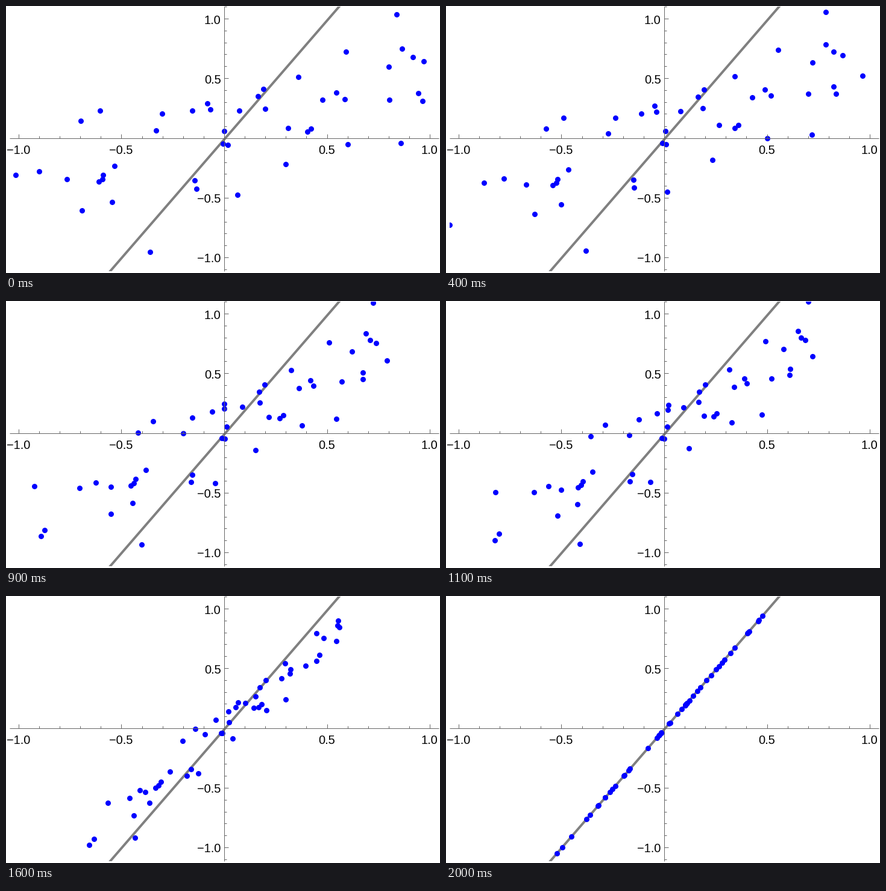
Write a matplotlib script that moves like this. It is 720x444 px and loops after 2100 ms.

```python
import numpy as np
import matplotlib.pyplot as plt
from matplotlib.animation import FuncAnimation
from matplotlib.patches import Rectangle

W, H, DPI = 720, 444, 100
PX = 72 / DPI                      # points per pixel
FRAMES, INTERVAL = 21, 100
ORIGIN = np.array([361, 219])      # axes crossing, in pixels
UNIT = np.array([341, -198])       # pixels per data unit
SLOPE, INTERCEPT = 1.995, -0.015
LEFT, RIGHT, TOP, BOTTOM = 5, 717, 0.5, 440

plt.rcParams["font.family"] = "Liberation Sans"

# Starting positions in pixels; some lie outside the plot range.
START = np.array([
    (-111, 262), (-46, 360.3), (-41, 349.6), (15, 280), (54, 274),
    (100, 287), (125, 339), (175, 325), (153, 291), (159, 287),
    (160, 280), (179, 265), (123, 191), (155, 174), (248, 206),
    (258, 179), (308, 174), (333, 162), (338, 172), (361, 207),
    (359, 228), (367, 230), (386, 174), (312, 289), (315, 303),
    (238, 408), (383, 313), (463, 262), (417, 150), (426, 138),
    (429, 171), (467, 202), (499, 208), (505, 203), (484, 118),
    (524, 156), (547, 144), (561, 155), (563, 76), (566, 229),
    (654, 227), (634, 101), (635, 156), (647, 14), (656, 71),
    (674, 85), (692, 92), (683, 145), (690, 158), (738, 129.7),
])


def to_px(p):
    return ORIGIN + np.asarray(p) * UNIT


def project(p):
    """Orthogonal projection of data points onto the line."""
    x = (p[:, 0] + SLOPE * (p[:, 1] - INTERCEPT)) / (1 + SLOPE**2)
    return np.column_stack([x, SLOPE * x + INTERCEPT])


END = to_px(project((START - ORIGIN) / UNIT))

fig = plt.figure(figsize=(W / DPI, H / DPI), dpi=DPI, facecolor="white")
ax = fig.add_axes([0, 0, 1, 1])
ax.set_xlim(-0.5, W - 0.5)
ax.set_ylim(H - 0.5, -0.5)
ax.axis("off")
clip = Rectangle((LEFT, TOP), RIGHT - LEFT, BOTTOM - TOP,
                 transform=ax.transData)


def stroke(x, y):
    ax.plot(x, y, color="0.4", lw=PX, solid_capstyle="butt", zorder=3)


def label(value, x, y, ha):
    text = f"{value:.1f}".replace("-", "\u2212")
    ax.text(x, y, text, ha=ha, va="baseline", fontsize=20 * PX,
            color="black", zorder=4)


ends = to_px([(x, SLOPE * x + INTERCEPT) for x in (-0.7, 0.7)])
line, = ax.plot(*ends.T, color="0.5", lw=4 * PX, zorder=1)
line.set_clip_path(clip)

ox, oy = ORIGIN
stroke([LEFT, RIGHT], [oy, oy])
stroke([ox, ox], [TOP, BOTTOM])
for k in range(-11, 12):
    if k == 0:
        continue
    v = k / 10
    tx, ty = np.round(to_px((v, v)))
    major = k % 5 == 0
    size = 7 if major else 4
    if abs(k) <= 10:
        stroke([tx, tx], [oy, oy - size])
    stroke([ox, ox + size], [ty, ty])
    if major:
        label(v, tx, 245, "center")
        label(v, 356, ty + 8, "right")

dots, = ax.plot([], [], "o", color="blue", ms=9 * PX, mew=0, zorder=2)
dots.set_snap(False)
dots.set_clip_path(clip)


def update(i):
    t = i / (FRAMES - 1)
    dots.set_data(*(START + (END - START) * t).T)
    return dots,


anim = FuncAnimation(fig, update, frames=FRAMES, interval=INTERVAL,
                     repeat=True, repeat_delay=0)
plt.show()
```
